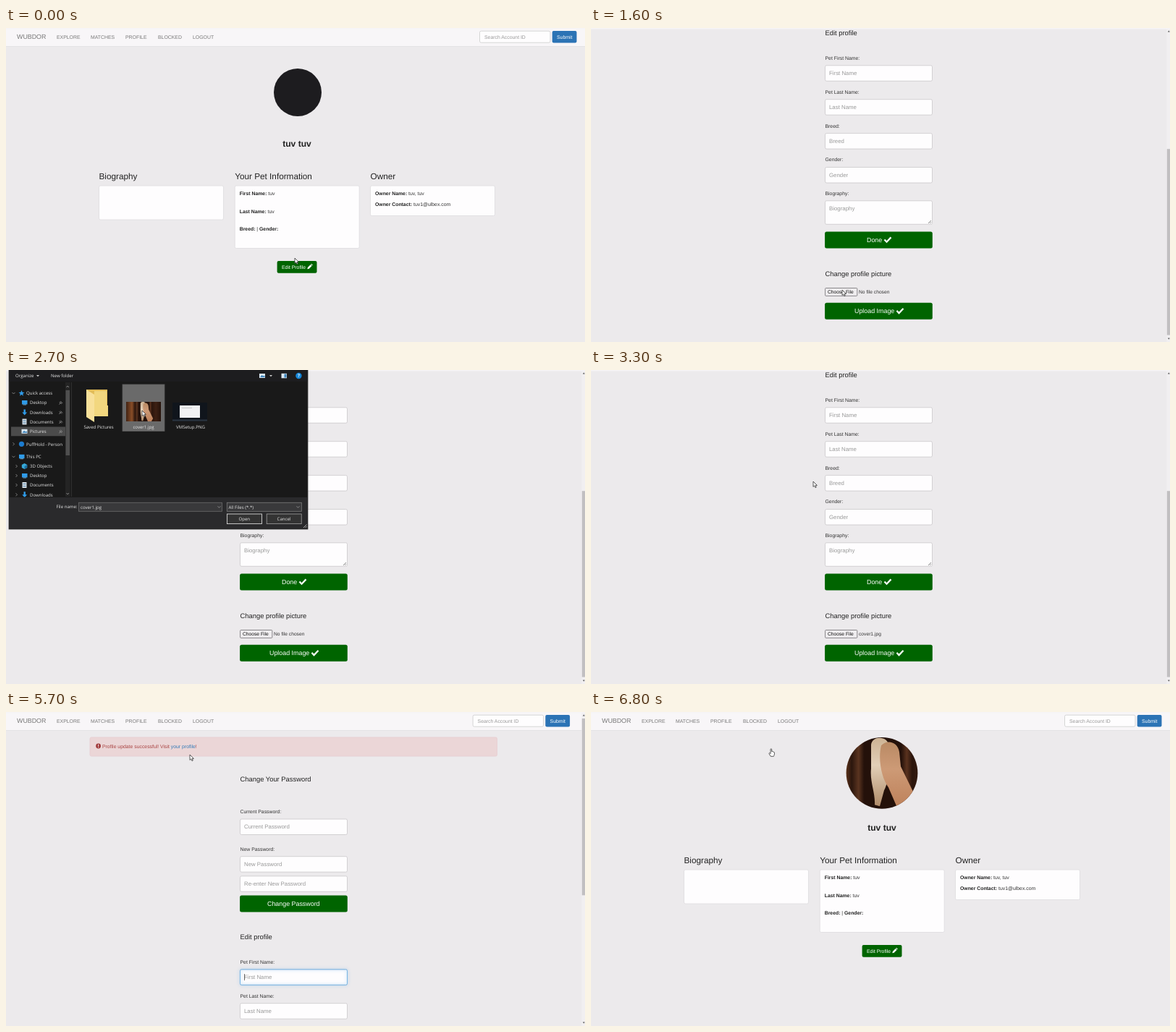
Recreate the animation shown at these times as an HTML page. Size 800x434 px, loop 6.9 s.

```html
<!DOCTYPE html>
<html lang="en">
<head>
<meta charset="utf-8">
<title>Pet profile walkthrough</title>
<style>
html, body { margin: 0; width: 100%; height: 100%; overflow: hidden; background: #eceaec; }
svg { display: block; width: 800px; height: 434px; font-family: "Liberation Sans", Arial, sans-serif; text-rendering: geometricPrecision; }
#dialog, #status { font-family: "Open Sans", "Noto Sans", sans-serif; }
text { white-space: pre; }
</style>
</head>
<body>
<svg id="stage" viewBox="0 0 800 434"></svg>
<script>
const LOOP = 6900, GREEN = '#006400', INK = '#333';

// Markup helpers
const text = (x, y, s, size = 6.86, fill = INK, more = '') =>
  `<text x="${x}" y="${y}" font-size="${size}" fill="${fill}" ${more}>${s}</text>`;
const rect = (x, y, w, h, fill, stroke = 'none', r = 0, more = '') =>
  `<rect x="${x}" y="${y}" width="${w}" height="${h}" fill="${fill}" stroke="${stroke}" stroke-width=".8" rx="${r}" ${more}/>`;
const path = (d, fill, more = '') => `<path d="${d}" fill="${fill}" ${more}/>`;
const group = (id, body, more = '') => `<g id="${id}" ${more}>${body}</g>`;
const bold = s => `<tspan font-weight="bold" fill="#222">${s}</tspan>`;
const tick = (x, y) => path(`M${x} ${y}l3 3.2l6-6.3`, 'none', 'stroke="#fff" stroke-width="2.3"');
const gradient = (id, dir, stops) => `<linearGradient id="${id}" ${dir}>` +
  stops.map(([at, c]) => `<stop offset="${at}" stop-color="${c}"/>`).join('') + '</linearGradient>';

const nav = () => rect(0, 0, 800, 25, '#f8f6f8') + rect(0, 25, 800, .8, '#e3e1e4') +
  text(15, 15.2, 'WUBDOR', 8.9, '#777') +
  [[70, 'EXPLORE'], [117, 'MATCHES'], [165, 'PROFILE'], [210, 'BLOCKED'], [258, 'LOGOUT']]
    .map(([x, s]) => text(x, 14.5, s, 6.9, '#777')).join('');
const search = dx => `<g transform="translate(${dx})">` + rect(654.5, 4.2, 97.5, 16, '#fefdfe', '#ccc', 2) +
  text(661, 14.5, 'Search Account ID', 6.86, '#999') +
  rect(754.7, 4, 33.8, 16.4, '#2b73b5', 'none', 2) + text(761, 14.5, 'Submit', 6.86, '#fff') + '</g>';

// Profile page
const photo = rect(-95, -52, 190, 104, 'url(#room)') +
  path('M-15-39C-14-52 9-52 9-38L8-22C11-4 9 12 3 24L-3 46L-10 44C-9 27-17 12-15-6Z', 'url(#fur)') +
  path('M-1-38C7-47 22-43 24-29L26-9L47 34L38 50H22L9 20C0 8-6-18-1-38Z', 'url(#skin)');

const card = (x, title, h, rows) => text(x, 209, title, 11.75, '#222') +
  rect(x, 218, 172, h, '#fefdfe', '#dedcdf', 2) +
  rows.map(([dy, s]) => text(x + 6.5, 231.3 + dy, s)).join('');

const profile = nav() + search(0) +
  '<circle id="icon" cx="403" cy="89" r="33" fill="#1d1c1f"/>' +
  group('portrait', `<g clip-path="url(#round)"><g transform="translate(402 84.3)">${photo}</g></g>`) +
  text(402, 164, 'tuv tuv', 12.1, '#222', 'font-weight="bold" text-anchor="middle"') +
  card(128.5, 'Biography', 47, []) +
  card(316.2, 'Your Pet Information', 86.5, [
    [0, bold('First Name:') + ' tuv'], [24.4, bold('Last Name:') + ' tuv'],
    [48.8, bold('Breed:') + ' | ' + bold('Gender:')]]) +
  card(503.5, 'Owner', 41.5, [
    [0, bold('Owner Name:') + ' tuv, tuv'], [15, bold('Owner Contact:') + ' tuv1@ulbex.com']]) +
  rect(374.6, 322, 54.9, 16.7, GREEN, 'none', 2) + text(381, 332.6, 'Edit Profile', 6.86, '#fff') +
  path('M416.3 333.3l.6-2.4l3.9-3.9l1.8 1.8l-3.9 3.9zM421.3 326.5l.7-.7l1.8 1.8l-.7.7z', '#fff');

// Edit page, laid out for a scroll of 25
const label = (y, s) => text(323.5, y, s);
const heading = (y, s) => text(323.5, y, s, 9.4, '#222');
const input = (y, hint, h = 21.5) => rect(323.5, y, 148, h, '#fefdfe', '#c9c7ca', 2) +
  text(329, y + 13.3, hint, 7.85, '#999');
const button = (y, x, s) => rect(323.1, y - .2, 148.7, 22.9, GREEN, 'none', 2.5) + text(x, y + 14, s, 8.9, '#fff');

const form = heading(34, 'Change Your Password') +
  label(78, 'Current Password:') + input(86, 'Current Password') +
  label(129.7, 'New Password:') + input(137.7, 'New Password') + input(164.8, 'Re-enter New Password') +
  button(191.7, 361, 'Change Password') + heading(252, 'Edit profile') +
  [['Pet First Name:', 'First Name'], ['Pet Last Name:', 'Last Name'], ['Breed:', 'Breed'], ['Gender:', 'Gender']]
    .map(([s, hint], i) => label(286 + i * 46.8, s) + input(293.8 + i * 46.9, hint)).join('') +
  rect(323.5, 293.8, 148, 21.5, 'none', '#66afe9', 2, 'id="glow" filter="url(#blur)"') +
  rect(329.2, 300, .7, 9, INK, 'none', 0, 'id="caret"') +
  label(472.5, 'Biography:') + input(480.8, 'Biography', 32.5) +
  path('M466 512l4-4M468.3 512l1.7-1.7', 'none', 'stroke="#555" stroke-width=".7"') +
  button(523.7, 381, 'Done') + tick(405.5, 534.5) +
  heading(584.5, 'Change profile picture') +
  rect(323.6, 601.5, 44.2, 10.8, '#efedef', '#6f6d70', 1) + text(327, 609.2, 'Choose File', 6.7, '#111') +
  text(370, 608.8, '', 6.7, INK, 'id="chosen"') +
  button(622, 364, 'Upload Image') + tick(422.5, 632.8);

const alertBox = rect(116, 35, 562.5, 26, '#ebd6d7', '#e8ccd1', 2) +
  '<circle cx="127.6" cy="47" r="3.4" fill="#a0393a"/>' + rect(127, 44.8, 1.2, 2.7, '#ebd6d7') + rect(127, 48.2, 1.2, 1.1, '#ebd6d7') +
  text(133, 50, 'Profile update successful! Visit <tspan fill="#337ab7">your profile</tspan>!', 6.86, '#a94442');

const edit = group('editNav', nav() + search(-9.4) + group('alert', alertBox)) + group('form', form) +
  rect(795.3, 0, 4.7, 434, '#f1eff1') + rect(795.8, 9, 4.2, 245, '#c1bfc1', 'none', 0, 'id="thumb"') +
  path('M796.8 5.5l1.5-2l1.5 2zM796.8 428.5l1.5 2l1.5-2z', '#555');

// File dialog
const LIGHT = '#e6e6e6', BLUE = '#2f9be8';
const dlg = (x, y, s, more) => text(x, y, s, 6.1, LIGHT, more);
const chevron = (x, y, open) => path(open ? `M${x - 2} ${y - 1}l2 2l2-2` : `M${x - 1} ${y - 2}l2 2l-2 2`,
  'none', 'stroke="#aaa" stroke-width=".7"');
const icons = {
  star: (x, y) => path(`M${x} ${y - 4}l1.1 2.7l2.9.2l-2.2 1.9l.7 2.9l-2.5-1.6l-2.5 1.6l.7-2.9l-2.2-1.9l2.9-.2z`, BLUE),
  screen: (x, y) => rect(x - 3.5, y - 3, 7.5, 5.5, BLUE) + rect(x - 2, y + 2.6, 4.5, .8, '#8bc8f2'),
  down: (x, y) => path(`M${x - 1} ${y - 4}h2.4v4h2.2l-3.4 4l-3.4-4h2.2z`, BLUE),
  page: (x, y) => rect(x - 3, y - 4, 6, 8, '#d5dde4') + rect(x - 2, y - 2, 4, 1, '#4b7fa8') + rect(x - 2, y + 1, 4, 1, '#4b7fa8'),
  image: (x, y) => rect(x - 4, y - 3, 8, 6, '#dbe8f2') + path(`M${x - 3} ${y + 2}l2.5-3l2 1.6l1.2-1l1.3 2.4z`, '#3c83ba'),
  dot: (x, y) => `<circle cx="${x}" cy="${y}" r="3.6" fill="#1c7cd0"/>`,
  cube: (x, y) => path(`M${x} ${y - 4}l3.7 2v4l-3.7 2l-3.7-2v-4z`, '#37a9d8') + path(`M${x} ${y}l3.7-2v4l-3.7 2z`, '#1d6e9f')
};
const tree = [
  [32, 'star', 'Quick access', 'open'], [45, 'screen', 'Desktop', 'pin'], [58.4, 'down', 'Downloads', 'pin'],
  [71.5, 'page', 'Documents', 'pin'], [84.8, 'image', 'Pictures', 'pin'], [102.3, 'dot', 'PuffHold - Person', 'root'],
  [119.8, 'screen', 'This PC', 'open'], [133, 'cube', '3D Objects', ''], [146, 'screen', 'Desktop', ''],
  [159, 'page', 'Documents', ''], [172.3, 'down', 'Downloads', '']
].map(([y, icon, s, kind]) => {
  const root = kind == 'open' || kind == 'root';
  return icons[icon](root ? 21.5 : 25.5, y) + dlg(root ? 28 : 33, y + 2.2, s) +
    (kind == 'pin' ? path(`M73.5 ${y + 2.5}l2-2.2m-1.7-1.3l3 3m-1.5-3.8l2.7 2.7`, 'none', 'stroke="#aaa" stroke-width=".8"')
      : chevron(root ? 10.5 : 14.5, y, kind == 'open'));
}).join('');

const dialog = rect(4, 0, 413, 220, '#191919', '#3a3a3a') + rect(4.4, 0, 412.2, 16, '#1d1d1f') +
  dlg(13, 10.4, 'Organize') + path('M42 7h4l-2 2.3z', '#ccc') + dlg(62, 10.4, 'New folder') +
  icons.image(354, 8) + path('M364 7h4l-2 2.3z', '#ccc') +
  rect(380.5, 4.8, 7.5, 6.5, '#dbe8f2') + rect(384.5, 5.5, 3, 5, '#3c83ba') +
  '<circle cx="404.4" cy="8" r="4.2" fill="#1687d9"/>' + text(404.4, 10.3, '?', 6.3, '#fff', 'text-anchor="middle" font-weight="bold"') +
  rect(7, 78.5, 75, 12.8, '#4b4b4b') + `<g clip-path="url(#side)">${tree}</g>` +
  rect(82, 17, 6.5, 158, '#242424') + rect(82.5, 28, 5.5, 90, '#4f4f4f') + rect(90, 17, .7, 158, '#3c3c3c') +
  path('M83.5 24l1.7-2l1.7 2M83.5 170l1.7 2l1.7-2', 'none', 'stroke="#aaa" stroke-width=".7"') +
  rect(0, 20, 58, 64.5, '#4a4a4a', '#5c5c5c', 0, 'id="hover"') +
  path('M111 27h29v37h-29z', '#e3bd58') + path('M122 29h17v20h2v15h-20z', '#f2d77f') + path('M111 27l11 7v38l-11-7z', '#f8e09a') +
  `<g clip-path="url(#cover)"><g transform="translate(190 57.5) scale(.28)">${photo}</g></g>` +
  rect(230, 45, 48, 25.5, '#10151c') + rect(240, 49, 28, 17, '#f1f1f3') + rect(243, 52, 14, .7, '#bbb') + rect(230, 68.5, 48, 2, '#2c3642') +
  [[128, 'Saved Pictures'], [190, 'cover1.jpg'], [255, 'VMSetup.PNG']].map(([x, s]) => dlg(x, 81, s, 'text-anchor="middle"')).join('') +
  rect(4.4, 176, 412.2, 43.6, '#2a2a2c') + dlg(98.5, 191.3, 'File name:', 'text-anchor="end"') +
  rect(100.5, 183.3, 198, 12, '#39393b', '#6c6c6c') + dlg(103, 191.5, '', 'id="picked"') + chevron(294.5, 189.3, true) +
  rect(305.3, 183.3, 103, 12, '#39393b', '#7c7c7c') + dlg(307.5, 191.5, 'All Files (*.*)') + chevron(403.5, 189.3, true) +
  rect(305.5, 199, 48, 13.6, '#333', '#e8e8e8') + dlg(329.3, 208, 'Open', 'text-anchor="middle"') +
  rect(360.2, 199, 48, 13.6, '#333', '#a0a0a0') + dlg(384, 208, 'Cancel', 'text-anchor="middle"') +
  path('M411 218l4.5-4.5M413.5 218l2-2', 'none', 'stroke="#aaa" stroke-width="1"');

const outline = 'stroke="#333" stroke-width=".8" stroke-linejoin="round"';
const pointers = path('M0 0v7.4l1.7-1.5l1.3 2.7l1.3-.6l-1.2-2.6h2.3z', '#fff', `id="arrow" ${outline}`) +
  path('M-.9 .6C-.9-.5 .7-.5 .7 .6V3.7C1.4 3 2.1 3.4 2.1 4C2.8 3.5 3.4 3.9 3.4 4.6C4 4.2 4.5 4.6 4.5 5.3C4.5 8 4 9 3.4 10.3H-.7L-3 6.6C-3.4 5.7-2.3 5.2-1.7 5.8L-.9 6.6Z', '#fff', `id="hand" ${outline}`);

document.getElementById('stage').innerHTML = `<defs>
  <filter id="blur" x="-10%" y="-50%" width="120%" height="200%"><feDropShadow dx="0" dy="0" stdDeviation="2" flood-color="#66afe9"/></filter>
  <clipPath id="round"><circle cx="402" cy="84.3" r="49.4"/></clipPath>
  <clipPath id="side"><rect x="6" y="17" width="74.5" height="158.5"/></clipPath>
  <clipPath id="cover"><rect x="166" y="44" width="48" height="27"/></clipPath>` +
  gradient('room', '', [[0, '#28140c'], [.2, '#8a4e28'], [.28, '#2b160d'], [.33, '#5a3420'], [.37, '#24110a'],
    [.64, '#24110a'], [.68, '#5a321e'], [.72, '#2b150c'], [.82, '#3d2013'], [1, '#1c0d07']]) +
  gradient('fur', 'x2="0" y2="1"', [[0, '#cdb394'], [.4, '#e2cfb7'], [1, '#b08c6a']]) +
  gradient('skin', 'x2="0" y2="1"', [[0, '#b98a64'], [.4, '#cd9a76'], [1, '#bd8059']]) + '</defs>' +
  rect(0, 0, 800, 434, '#eceaec') + group('profile', profile) + group('edit', edit) + rect(0, 0, 800, 1.6, '#f6f4f6') +
  group('status', rect(-2, 422, 112.3, 14, '#514f52', '#454346', 2) + text(2, 430.6, 'https://wubdor.herokuapp.com/edit', 6.1, '#e2e0e2')) +
  group('dialog', dialog) + group('pointer', pointers);

const $ = id => document.getElementById(id);
const show = (id, on) => $(id).setAttribute('opacity', +on);
const move = (id, x, y) => $(id).setAttribute('transform', `translate(${x} ${y})`);

// Eased value of the keys [time, ...values] at t
function at(keys, t) {
  const i = keys.findIndex(k => k[0] > t);
  if (i < 0) return keys[keys.length - 1].slice(1);
  const [a, b] = [keys[i - 1], keys[i]], u = (t - a[0]) / (b[0] - a[0]), e = u * u * (3 - 2 * u);
  return a.slice(1).map((v, j) => v + (b[j + 1] - v) * e);
}

const POINTER = [[0, 399, 318], [200, 399, 328], [400, 399, 328], [800, 389, 293], [1200, 389, 293], [1500, 347, 362],
  [1600, 347, 362], [2000, 112, 51], [2100, 112, 51], [2400, 188, 56], [2800, 188, 56], [3300, 307, 154],
  [3700, 405, 389], [4300, 405, 394], [5000, 405, 394], [5500, 255, 60], [5700, 254, 59], [5900, 249, 51], [LOOP, 249, 51]];
const SCROLL = [[0, 0], [900, 0], [1000, 25], [1350, 267]];
const within = (t, ...spans) => spans.some(([a, b]) => t >= a && t < b);

function draw(t) {
  const onEdit = within(t, [400, 6200]), saved = t >= 4300;
  const [x, y] = at(POINTER, t), scroll = saved ? 0 : at(SCROLL, t)[0];
  show('profile', !onEdit);
  show('edit', onEdit);
  show('icon', t < 400);
  show('portrait', t >= 6200);
  show('alert', saved);
  show('status', within(t, [300, 1200]));

  move('editNav', 0, -scroll);
  move('form', 0, (saved ? 62 : 25) - scroll);
  const height = saved ? 739 : 702;
  $('thumb').setAttribute('y', 9 + scroll / height * 416);
  $('thumb').setAttribute('height', 434 / height * 416);
  show('glow', within(t, [500, 1600], [4500, 6200]));
  show('caret', within(t, [500, 1600], [4300, 6200]));
  $('chosen').textContent = t < 2800 ? 'No file chosen' : 'cover1.jpg';

  show('dialog', within(t, [1700, 2800]) ? 1 : within(t, [2800, 2900]) ? .4 : 0);
  const overFolder = x > 99 && x < 158, overCover = x > 160 && x < 220;
  show('hover', y > 20 && y < 85 && (overFolder || overCover));
  $('hover').setAttribute('x', overFolder ? 99.5 : 161);
  $('hover').setAttribute('fill', t >= 2500 ? '#6a6a6a' : '#4a4a4a');
  $('picked').textContent = t >= 2500 ? 'cover1.jpg' : '';

  const hand = within(t, [200, 500], [3700, 5100], [5900, LOOP]);
  show('hand', hand);
  show('arrow', !hand);
  move('pointer', x, y);
}

const start = performance.now();
function tickFrame() {
  draw(Math.floor((performance.now() - start) % LOOP / 100) * 100);
  requestAnimationFrame(tickFrame);
}
tickFrame();
</script>
</body>
</html>
```
